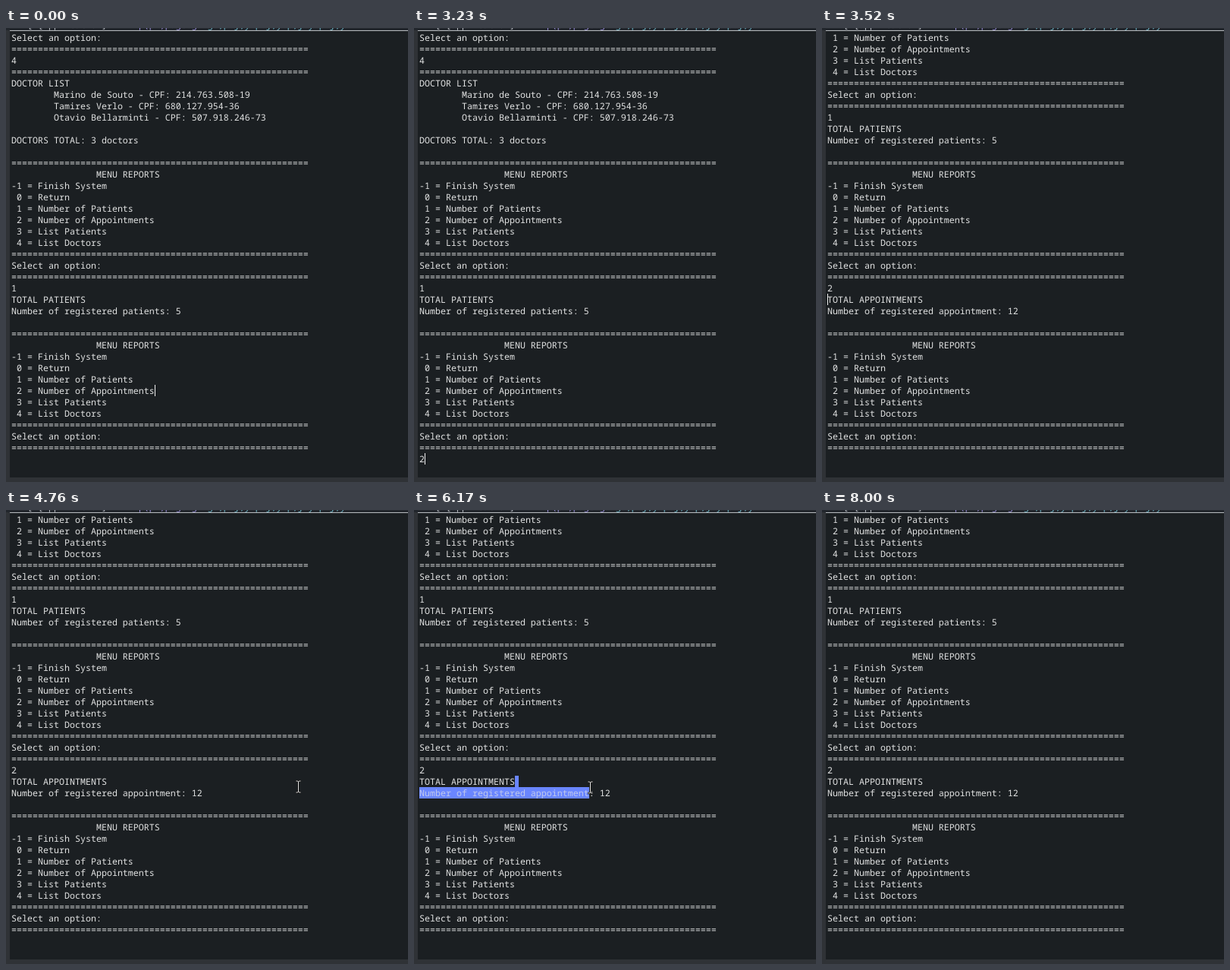
An HTML page for the animation above (8.1 s loop, 530 by 598 pixels).

```html
<!DOCTYPE html>
<html lang="en">
<head>
<meta charset="utf-8">
<title>Console reports</title>
<style>
  html, body { margin: 0; width: 100%; height: 100%; overflow: hidden; background: #1b1f22; }
  svg { display: block; }
  text {
    font: 11.667px "Noto Sans Mono", "DejaVu Sans Mono", monospace;
    white-space: pre;
    text-rendering: geometricPrecision;
    fill: #e2e3e3;
  }
</style>
</head>
<body>
<svg width="530" height="598" viewBox="0 0 530 598">
  <defs>
    <clipPath id="view"><rect x="5" y="5" width="525" height="581"/></clipPath>
    <clipPath id="strip"><rect width="530" height="3"/></clipPath>
  </defs>
  <rect width="530" height="598" fill="#2f3236"/>
  <rect x="5" y="4" width="525" height="588" fill="#1b1f22"/>
  <rect width="530" height="3" fill="#22262c"/>
  <g clip-path="url(#strip)">
    <text x="28" y="0"><tspan fill="#b9bdc4">[ [application] </tspan><tspan fill="#9a8fd8">    /p(pk)page.g </tspan><tspan fill="#6fb7c8"> g.,p.j,y/p.j,y.p,j.y p.j,y</tspan></text>
  </g>
  <rect x="5" y="3" width="525" height="1" fill="#b9bdc0"/>
  <g clip-path="url(#view)">
    <g id="page">
      <path id="selection" fill="#6a86ff"/>
      <g id="lines"></g>
      <path id="veil" fill="#6a86ff" opacity=".28"/>
      <rect id="caret" width="1" height="15" fill="#f2f2f2"/>
    </g>
  </g>
  <g id="pointer" fill="none">
    <path d="M-3.5-7.5H-1L0-6.5L1-7.5H3.5M0-6.5V6.5M-3.5 7.5H-1L0 6.5L1 7.5H3.5" stroke="#111" stroke-width="2.4"/>
    <path d="M-3-7.5H-1L0-6.5L1-7.5H3M0-6.5V6.5M-3 7.5H-1L0 6.5L1 7.5H3" stroke="#e4e4e4"/>
  </g>
</svg>
<script>
const LOOP = 8100, LEFT = 7, TOP = 5, CHAR = 7, ROW = 15;
const $ = id => document.getElementById(id);

const rule = "=".repeat(56);
const tab = " ".repeat(8);
const prompt = [rule, "Select an option:", rule];
const menu = [
  "", rule, tab + tab + "MENU REPORTS",
  "-1 = Finish System", " 0 = Return", " 1 = Number of Patients",
  " 2 = Number of Appointments", " 3 = List Patients", " 4 = List Doctors",
  ...prompt
];
const lines = [
  ...prompt.slice(1), "4", rule,
  "DOCTOR LIST",
  tab + "Marino de Souto - CPF: 214.763.508-19",
  tab + "Tamires Verlo - CPF: 680.127.954-36",
  tab + "Otavio Bellarminti - CPF: 507.918.246-73",
  "", "DOCTORS TOTAL: 3 doctors", ...menu,
  "1", "TOTAL PATIENTS", "Number of registered patients: 5", ...menu,
  "2", "TOTAL APPOINTMENTS", "Number of registered appointment: 12", ...menu
];
const TYPED = lines.indexOf("2"), TITLE = TYPED + 1;
const titleLength = lines[TITLE].length;
const END = lines.length;

const rows = lines.map((line, i) => {
  const row = document.createElementNS("http://www.w3.org/2000/svg", "text");
  row.setAttribute("x", LEFT);
  row.setAttribute("y", TOP + i * ROW + 12);
  row.textContent = line;
  return $("lines").appendChild(row);
});

// Each track holds [start time, ...values]; values stay until the next entry.
const scroll = [[0, 0], [3380, -4], [3520, -225]];
const shown = [[0, TYPED], [2210, TITLE], [3520, END]];
const caret = [ // column, line
  [0, 27, 31], [310], [740, 27, 31], [1300], [1900, 27, 31],
  [2210, 1, TYPED], [2800], [3230, 1, TYPED], [3380, 0, TITLE], [4060],
  [4770, 36, TITLE + 1], [4910], [5910, 18, TITLE], [6030],
  [7290, 0, END], [7860]
];
const selection = [ // offsets across the two result lines
  [0], [4910, 43, 55], [5060, 18, 55], [5210, 10, 55], [5360, 4, 55], [5480, 0, 55],
  [5910], [6030, 18, 41], [6170, 18, 51], [7290]
];
const pointer = [ // x, y
  [0], [4480, 504, 350], [4620, 385, 364], [4770, 261, 372], [4910, 172, 369],
  [5060, 130, 362], [5210, 72, 358], [5360, 34, 350], [5480, 11, 344],
  [5630, 34, 353], [5770, 92, 383], [5910, 136, 359], [6030, 163, 367], [6170, 232, 365],
  [6450, 137, 364], [6580, 340, 466], [6700, 511, 554],
  [7000, 502, 556], [7140, 486, 559], [7290, 474, 562], [7430, 474, 566],
  [7570, 478, 574], [7720, 484, 583], [7860, 489, 592], [8000]
];

const at = (track, t) => track.findLast(key => key[0] <= t).slice(1);
const show = (node, on) => node.setAttribute("visibility", on ? "visible" : "hidden");

function band(line, from, to, extra = 0) {
  const y = TOP + line * ROW;
  return `M${LEFT + from * CHAR} ${y}H${LEFT + to * CHAR + extra}v${ROW}H${LEFT + from * CHAR}z`;
}

function selectionPath(from, to) {
  if (from === undefined) return "";
  const second = titleLength + 1;
  const first = from < second ? band(TITLE, from, titleLength, 5) : "";
  return first + band(TITLE + 1, Math.max(0, from - second), to - second);
}

function render(t) {
  $("page").setAttribute("transform", `translate(0 ${at(scroll, t)[0]})`);
  const [count] = at(shown, t);
  rows.forEach((row, i) => show(row, i < count));

  const [column, line] = at(caret, t);
  show($("caret"), line !== undefined);
  if (line !== undefined) {
    $("caret").setAttribute("x", LEFT + column * CHAR);
    $("caret").setAttribute("y", TOP + line * ROW);
  }

  const path = selectionPath(...at(selection, t));
  $("selection").setAttribute("d", path);
  $("veil").setAttribute("d", path);

  const [x, y] = at(pointer, t);
  show($("pointer"), x !== undefined);
  if (x !== undefined) $("pointer").setAttribute("transform", `translate(${x + .5} ${y + .5})`);
}

const start = performance.now();
function tick() {
  render((performance.now() - start) % LOOP);
  requestAnimationFrame(tick);
}
tick();
</script>
</body>
</html>
```
